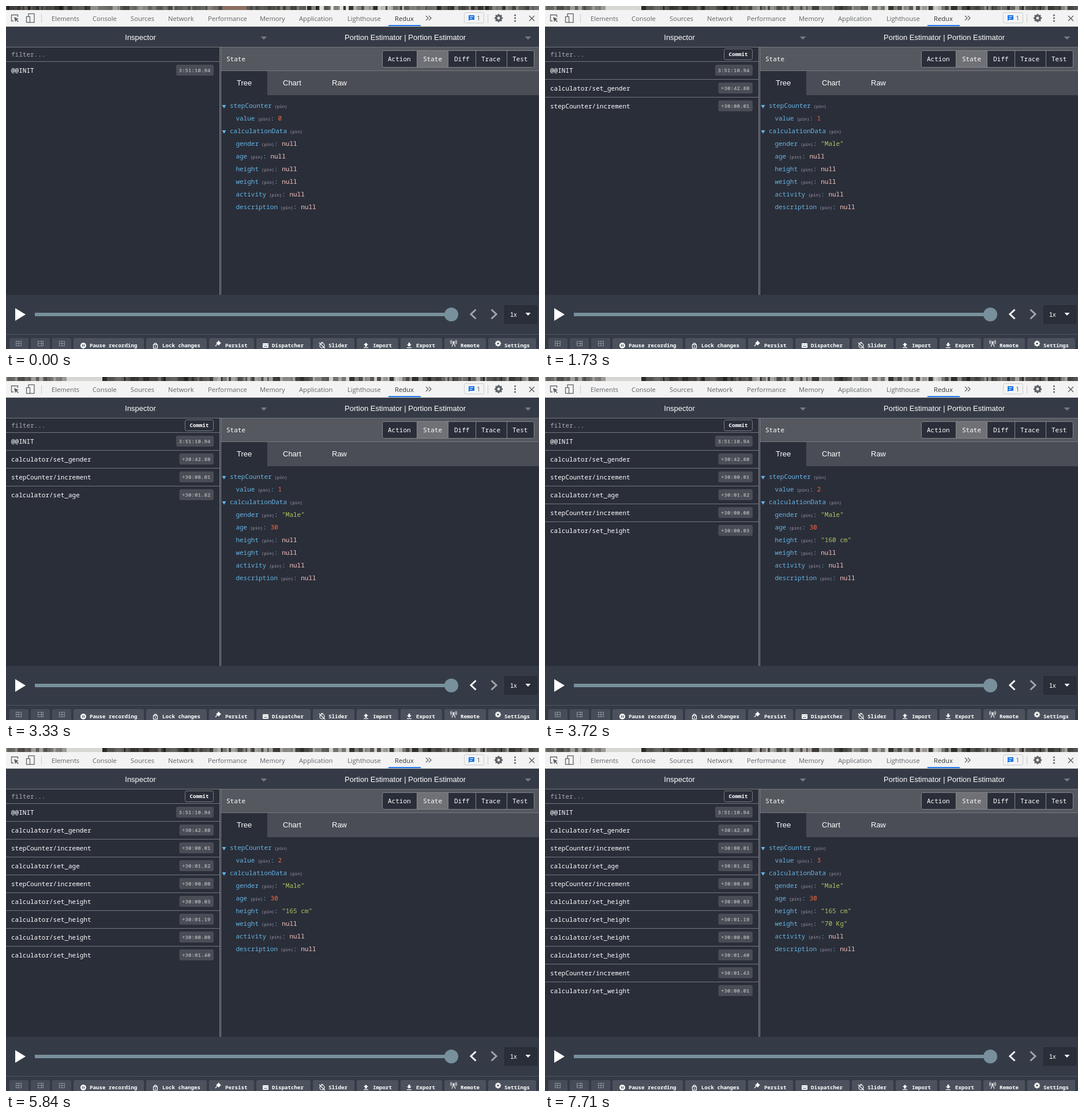
Recreate the animation shown at these times as an HTML page with a canvas. Size 924x596 px, loop 8 s.

```html
<!DOCTYPE html>
<html lang="en">
<head>
<meta charset="utf-8">
<title>State inspector</title>
<style>
html, body { margin: 0; width: 100%; height: 100%; overflow: hidden; background: #2a2f3a; }
canvas { display: block; }
</style>
</head>
<body>
<canvas id="stage" width="924" height="596"></canvas>
<script>
const ctx = document.getElementById('stage').getContext('2d');
const LOOP = 8000;
const DARK = '#2a2e39', BAR = '#353b46', LINE = '#74777d', KEY = '#66b4e4', GREY = '#5f6368';
const NUM = '#f4693f', STR = '#aac860', NIL = '#f8c6bf';
const MONO = '"Noto Sans Mono", "DejaVu Sans Mono", monospace';
const CODE = '11px ' + MONO, ROW = '500 ' + CODE, SMALL = 'bold 9.17px ' + MONO, PIN = '7.33px ' + MONO;
const SANS = '13px "Liberation Sans", Arial, sans-serif';
const TAB = '11.2px "Open Sans", "Noto Sans", sans-serif';

// [time, action, stamp]
const actions = [
  [0, '@@INIT', '3:51:10.94'],
  [1470, 'calculator/set_gender', '+30:42.80'],
  [1600, 'stepCounter/increment', '+30:00.01'],
  [3330, 'calculator/set_age', '+30:01.82'],
  [3720, 'stepCounter/increment', '+30:00.00'],
  [3720, 'calculator/set_height', '+30:00.03'],
  [4390, 'calculator/set_height', '+30:01.19'],
  [4920, 'calculator/set_height', '+30:00.00'],
  [5840, 'calculator/set_height', '+30:01.40'],
  [7310, 'stepCounter/increment', '+30:01.43'],
  [7710, 'calculator/set_weight', '+30:00.01']
];

function rect(x, y, w, h, fill) {
  ctx.fillStyle = fill;
  ctx.fillRect(x, y, w, h);
}

function box(x, y, w, h, r, fill, stroke) {
  ctx.beginPath();
  ctx.roundRect(x, y, w, h, r);
  if (fill) { ctx.fillStyle = fill; ctx.fill(); }
  if (stroke) { ctx.strokeStyle = stroke; ctx.lineWidth = 1; ctx.stroke(); }
}

function text(str, x, y, font, fill, align = 'left') {
  ctx.font = font;
  ctx.fillStyle = fill;
  ctx.textAlign = align;
  ctx.fillText(str, x, y);
}

function poly(points, fill) {
  ctx.beginPath();
  for (let i = 0; i < points.length; i += 2) ctx.lineTo(points[i], points[i + 1]);
  ctx.fillStyle = fill;
  ctx.fill();
}

function stroke(points, color, width = 1) {
  ctx.beginPath();
  for (let i = 0; i < points.length; i += 2) ctx.lineTo(points[i], points[i + 1]);
  ctx.strokeStyle = color;
  ctx.lineWidth = width;
  ctx.stroke();
}

function disc(x, y, r, fill) {
  ctx.beginPath();
  ctx.arc(x, y, r, 0, Math.PI * 2);
  ctx.fillStyle = fill;
  ctx.fill();
}

function ring(x, y, r, color, width, from = 0, to = Math.PI * 2) {
  ctx.beginPath();
  ctx.arc(x, y, r, from, to);
  ctx.strokeStyle = color;
  ctx.lineWidth = width;
  ctx.stroke();
}

const caret = (x, y, w, h, fill) => poly([x - w, y, x + w, y, x, y + h], fill);

function gear(x, y, r, color) {
  ring(x, y, r * 0.58, color, r * 0.5);
  for (let i = 0; i < 8; i++) {
    const a = i * Math.PI / 4, c = Math.cos(a), s = Math.sin(a);
    stroke([x + c * r * 0.7, y + s * r * 0.7, x + c * r, y + s * r], color, r * 0.36);
  }
}

// Sliver of a soft, blurred room photo above the panel
function photo(scene) {
  const first = scene === 0;
  let seed = first ? 11 : 29;
  const rand = () => (seed = seed * 16807 % 2147483647) / 2147483647;
  const bars = (from, to, low, high) => {
    for (let x = from; x < to;) {
      const w = 2 + rand() * 7, v = Math.round(low + rand() * (high - low));
      rect(x, 0, Math.min(w, to - x), 7, `rgb(${v},${v - 2},${v - 5})`);
      x += w;
    }
  };
  rect(0, 0, 924, 7, '#6d6a66');
  if (first) {
    bars(0, 140, 30, 110);
    bars(140, 375, 60, 160);
    rect(375, 0, 42, 7, '#8d6f62');
    bars(417, 520, 50, 130);
    bars(520, 690, 40, 230);
    bars(690, 924, 40, 140);
  } else {
    bars(0, 105, 70, 170);
    rect(105, 0, 62, 7, '#d8d6d2');
    bars(167, 350, 35, 110);
    bars(350, 560, scene === 1 ? 50 : 40, scene === 1 ? 160 : 180);
    bars(560, 700, 50, 225);
    bars(700, 924, 35, 170);
  }
}

const tabs = [['Elements', 79], ['Console', 150], ['Sources', 216], ['Network', 281], ['Performance', 350],
  ['Memory', 440], ['Application', 508], ['Lighthouse', 592], ['Redux', 674]];

function toolbar() {
  rect(0, 7, 924, 29, '#f3f3f3');
  rect(0, 35, 924, 1, '#cdcdcd');
  stroke([13, 26, 9.5, 26, 9.5, 15.5, 20.5, 15.5, 20.5, 19], GREY, 1.3);
  poly([14, 19, 22, 22.5, 18.8, 23.8, 22, 27, 20.8, 28, 17.6, 25, 16, 28], GREY);
  ctx.strokeStyle = GREY;
  ctx.lineWidth = 1.3;
  ctx.strokeRect(39, 13.5, 10, 15);
  rect(34, 18, 8, 11, '#f3f3f3');
  ctx.strokeRect(35.5, 18.5, 6, 10);
  rect(61, 14, 1, 15, '#cbcbcb');
  rect(835, 14, 1, 15, '#cbcbcb');
  for (const [name, x] of tabs) text(name, x, 26, TAB, name === 'Redux' ? '#333' : GREY);
  rect(663, 33, 56, 2, '#1a73e8');
  for (const x of [728, 733]) stroke([x, 17, x + 4, 21, x, 25], GREY, 1.3);
  box(794.5, 11.5, 34, 18, 2, '#f3f3f3', '#cbcbcb');
  poly([802, 16, 812, 16, 812, 24, 804, 24, 802, 26], '#1a73e8');
  rect(804, 18, 6, 1, '#fff');
  rect(804, 21, 4, 1, '#fff');
  text('1', 816, 25, TAB, GREY);
  gear(854, 21, 7.2, GREY);
  for (const y of [16, 21, 26]) disc(882.5, y, 1.6, GREY);
  stroke([907, 17, 916, 26], GREY, 1.5);
  stroke([916, 17, 907, 26], GREY, 1.5);
}

function header() {
  rect(0, 36, 924, 35, BAR);
  text('Inspector', 233, 59, SANS, '#fff', 'center');
  text('Portion Estimator | Portion Estimator', 692, 59, SANS, '#fff', 'center');
  caret(447, 53, 5.5, 5.5, '#747981');
  caret(905, 53, 5.5, 5.5, '#747981');
  rect(0, 71, 924, 1, LINE);
}

function actionList(t) {
  text('filter...', 9, 88, CODE, '#a9abb4');
  rect(0, 96, 370, 1, LINE);
  if (t >= 1600) {
    box(310.5, 74.5, 49, 19, 3, DARK, '#7b7e84');
    text('Commit', 335, 87, SMALL, '#fff', 'center');
  }
  actions.filter(a => t >= a[0]).forEach(([, name, stamp], i) => {
    const y = 112 + i * 31;
    if (i) rect(0, y - 16, 370, 1, LINE);
    text(name, 9, y + 4, ROW, '#fff');
    const w = stamp.length * 5.5 + 10;
    box(360 - w, y - 10, w, 19, 3, '#4a4d56');
    text(stamp, 354.5, y + 3, SMALL, '#a2a4a8', 'right');
  });
  rect(370, 71, 1, 431, '#85888d');
  rect(372, 71, 1, 431, '#85888d');
}

function statePanel(t) {
  rect(373, 72, 551, 40, '#55585f');
  rect(373, 112, 551, 1, LINE);
  text('State', 382, 96, ROW, '#fff');
  box(652.5, 77.5, 263, 29, 3, DARK, '#85888d');
  rect(713, 78, 53, 28, '#6f7176');
  for (const x of [712, 766, 814, 868]) rect(x, 78, 1, 28, '#85888d');
  [['Action', 662], ['State', 723], ['Diff', 777], ['Trace', 824], ['Test', 878]]
    .forEach(([name, x]) => text(name, x, 96, ROW, '#fff'));
  rect(373, 113, 551, 42, '#4a4d55');
  rect(373, 113, 80, 42, DARK);
  [['Tree', 400], ['Chart', 480], ['Raw', 565]].forEach(([name, x]) => text(name, x, 138, SANS, '#fff'));

  const height = t < 4390 ? '"160 cm"' : '"165 cm"';
  const steps = actions.filter(a => t >= a[0] && a[1] === 'stepCounter/increment').length;
  const since = (at, value, color) => t >= at ? [value, color] : ['null', NIL];
  [
    ['stepCounter'],
    ['value', String(steps), NUM],
    ['calculationData'],
    ['gender', ...since(1470, '"Male"', STR)],
    ['age', ...since(3330, '30', NUM)],
    ['height', ...since(3720, height, STR)],
    ['weight', ...since(7710, '"70 Kg"', STR)],
    ['activity', 'null', NIL],
    ['description', 'null', NIL]
  ].forEach(([key, value, color], i) => {
    const y = 177 + i * 22, x = value ? 398.4 : 388;
    const pin = x + key.length * 6.6 + 5;
    if (!value) caret(378, y - 5, 3.5, 6, KEY);
    text(key, x, y, CODE, KEY);
    text('(pin)', pin, y, PIN, '#a69bb2');
    if (value) {
      text(':', pin + 22, y, CODE, KEY);
      text(value, pin + 35.2, y, CODE, color);
    }
  });
}

function player(t) {
  rect(0, 502, 924, 68, BAR);
  poly([16, 525, 34, 536, 16, 547], '#fff');
  rect(50, 533, 722, 6, '#77909c');
  disc(772, 536, 12, '#77909c');
  stroke([814.5, 527.5, 806, 535.5, 814.5, 543.5], t >= 1470 ? '#fff' : '#a2a5aa', 3);
  stroke([841.5, 527.5, 850, 535.5, 841.5, 543.5], '#a2a5aa', 3);
  box(864.5, 520.5, 56, 31, 0, DARK, '#252932');
  text('1x', 874, 540, '500 11px "Liberation Sans", Arial, sans-serif', '#fff');
  caret(905, 533, 4.5, 5, '#fff');
}

const buttons = [
  [117, 122, 'Pause recording', 145], [243, 105, 'Lock changes', 271], [352, 78, 'Persist', 380],
  [434, 94, 'Dispatcher', 461], [532, 72, 'Slider', 559], [608, 72, 'Import', 636],
  [684, 72, 'Export', 711], [760, 72, 'Remote', 788], [836, 83, 'Settings', 864]
];

function layoutIcon(x, kind) {
  const c = '#8d939c';
  ctx.strokeStyle = c;
  ctx.lineWidth = 1;
  ctx.strokeRect(x - 4.5, 582.5, 9, 8);
  stroke([x - 4, 586.5, x + 4, 586.5], c);
  stroke([x + kind, 583, x + kind, 590], c);
}

function icons() {
  const w = '#fff', b = '#4b525d';
  [[22, -0.5], [60, 1.5], [97, 0]].forEach(([x, kind]) => layoutIcon(x, kind));
  disc(134, 590, 5, w);
  rect(132, 588, 1.4, 4, b);
  rect(134.8, 588, 1.4, 4, b);
  ctx.strokeStyle = w;
  ctx.lineWidth = 1.2;
  ctx.strokeRect(255.5, 588.5, 7, 6);
  ring(259, 588, 2.2, w, 1.2, Math.PI, 0);
  disc(259, 591.5, 1, w);
  poly([368, 581, 373, 586, 371, 587, 369, 590, 364, 585, 367, 584], w);
  stroke([366.5, 587, 363, 591], w, 1.2);
  box(445, 586, 10, 8, 1, w);
  for (const x of [446.5, 449.5, 452.5]) rect(x, 588, 1.2, 1.2, b);
  rect(447, 591, 6, 1, b);
  ring(548, 590, 4, w, 1.2);
  stroke([543, 585, 553, 595], w, 1.2);
  rect(546, 584, 4, 1.2, w);
  poly([624, 585, 628, 589, 625.5, 589, 625.5, 592, 622.5, 592, 622.5, 589, 620, 589], w);
  rect(620, 593, 8, 1.2, w);
  poly([699, 592, 695, 588, 697.5, 588, 697.5, 585, 700.5, 585, 700.5, 588, 703, 588], w);
  rect(695, 593, 8, 1.2, w);
  disc(776, 584, 1.4, w);
  stroke([773, 592, 776, 585, 779, 592], w, 1.1);
  for (const r of [3.2, 5.4]) {
    ring(776, 584, r, w, 1, -0.8, 0.8);
    ring(776, 584, r, w, 1, Math.PI - 0.8, Math.PI + 0.8);
  }
  gear(853, 586.5, 5.2, w);
}

function footer() {
  rect(0, 570, 924, 1, '#515761');
  rect(0, 571, 924, 25, BAR);
  for (const x of [6, 43, 80]) box(x, 577, 33, 24, 3, '#464d58');
  for (const [x, w, label, tx] of buttons) {
    box(x, 577, w, 24, 3, '#4b525d');
    text(label, tx, 593, SMALL, '#fff');
  }
  icons();
}

function draw(t) {
  rect(0, 0, 924, 596, DARK);
  photo(t < 1470 ? 0 : t < 3330 ? 1 : 2);
  toolbar();
  header();
  actionList(t);
  statePanel(t);
  player(t);
  footer();
}

function tick() {
  draw(performance.now() % LOOP);
  requestAnimationFrame(tick);
}
tick();
</script>
</body>
</html>
```
